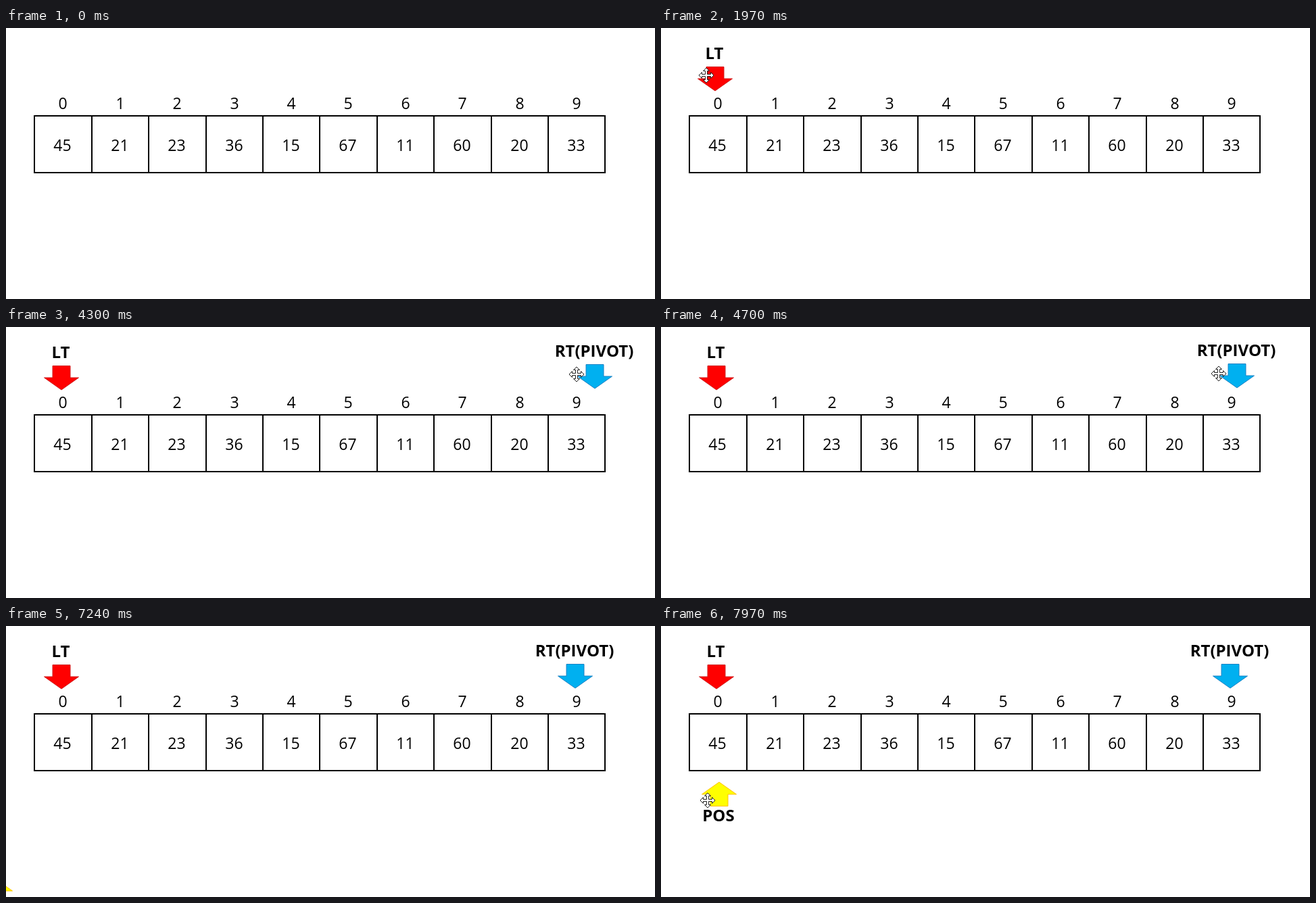
An HTML page that plays this animation: 960 px wide and 401 px high, repeating every 8000 ms.

```html
<!DOCTYPE html>
<html lang="en">
<head>
<meta charset="utf-8">
<title>Array pointers</title>
<style>
  html, body { margin: 0; width: 100%; height: 100%; overflow: hidden; background: #fff; }
  svg { display: block; }
  text { font: 23px "Open Sans", "Noto Sans", sans-serif; text-anchor: middle; }
  .label { font-size: 24px; font-weight: 700; }
  .grid { fill: none; stroke: #000; stroke-width: 2; }
  .frame { fill: none; stroke: #0078d4; stroke-dasharray: 4 3; }
  .handle { fill: #fff; stroke: #666; }
  .cursor { fill: #fff; stroke: #222; }
</style>
</head>
<body>
<svg id="stage" width="960" height="401" viewBox="0 0 960 401"></svg>
<script>
const LOOP = 8000;
const CELL = 84.4;
const stage = document.getElementById("stage");

function add(parent, tag, attrs, text) {
  const node = document.createElementNS("http://www.w3.org/2000/svg", tag);
  for (const name in attrs) node.setAttribute(name, attrs[name]);
  if (text !== undefined) node.textContent = text;
  return parent.appendChild(node);
}

// Array cells
add(stage, "rect", { class: "grid", x: 42, y: 130, width: 844, height: 84 });
[45, 21, 23, 36, 15, 67, 11, 60, 20, 33].forEach((value, i) => {
  const left = Math.round(42.4 + i * CELL);
  if (i) add(stage, "path", { class: "grid", d: `M${left} 130V214` });
  add(stage, "text", { x: left + 42, y: 120 }, i);
  add(stage, "text", { x: left + 41.5, y: 182 }, value);
});

// Each move eases from an offset to the start of the next move, or to rest.
// bow bends its path sideways; exit is where the mouse goes after release.
const pointers = [
  { label: "LT", x: 82, y: 93, dir: 1, baseline: 46, fill: "#f00", stroke: "#d01818",
    grab: [69, 70], release: 2140, exit: [899, 60], gone: 2370, deselect: 2900,
    box: { x: 37.5, y: 17.5, width: 79, height: 89 },
    moves: [
      { start: 500, end: 1100, from: [-95, -1], power: 3.3, bow: [0, -7] },
      { start: 1240, end: 1270, from: [-3, -1] },
      { start: 1970, end: 2000, from: [-2, 0] }
    ] },
  { label: "RT(PIVOT)", x: 842, y: 92, dir: 1, baseline: 45, fill: "#00b0f0", stroke: "#1c82c4",
    grab: [815, 71], release: 5570, exit: [251, 333], gone: 5740, deselect: 6300,
    box: { x: 772.5, y: 10.5, width: 141, height: 93 },
    moves: [
      { start: 4140, end: 4400, from: [145, 10], power: 2.6, bow: [0, 1] },
      { start: 4540, end: 4870, from: [19, -3] }
    ] },
  { label: "POS", x: 86, y: 231, dir: -1, baseline: 289, fill: "#ff0", stroke: "#ffc000",
    grab: [69, 258], release: LOOP,
    moves: [{ start: 7240, end: 7970, from: [-102, 143], power: 2, bow: [20, 0] }] }
];

for (const p of pointers) {
  p.node = add(stage, "g");
  add(p.node, "path", { fill: p.fill, stroke: p.stroke,
    d: `M${p.x} ${p.y}l-25.5 ${-18 * p.dir}h12.5v${-17.5 * p.dir}h26v${17.5 * p.dir}h12.5z` });
  add(p.node, "text", { class: "label", x: p.x - 1, y: p.baseline }, p.label);
  if (p.box) p.selection = addSelection(p.box);
}

function addSelection(box) {
  const group = add(stage, "g");
  add(group, "rect", { class: "frame", ...box });
  for (const u of [0, 0.5, 1])
    for (const v of [0, 0.5, 1])
      if (u !== 0.5 || v !== 0.5)
        add(group, "rect", { class: "handle", width: 4, height: 4,
          x: Math.floor(box.x + u * box.width) - 1.5, y: Math.floor(box.y + v * box.height) - 1.5 });
  return group;
}

// Four-way move cursor: one arm, turned four times
const outline = [];
let arm = [[-1.5, -1.5], [-1.5, -6.5], [-4.5, -6.5], [0, -11], [4.5, -6.5], [1.5, -6.5]];
for (let i = 0; i < 4; i++) {
  outline.push(...arm);
  arm = arm.map(([x, y]) => [-y, x]);
}
const cursor = add(stage, "polygon", { class: "cursor", points: outline.join(" ") });

function show(node, visible) {
  node.style.display = visible ? "" : "none";
}

function place(node, [x, y]) {
  node.setAttribute("transform", `translate(${Math.round(x)} ${Math.round(y)})`);
}

function progress(t, start, end) {
  return Math.min(1, Math.max(0, (t - start) / (end - start)));
}

function offsetAt(moves, t) {
  const i = Math.max(0, moves.filter(m => m.start <= t).length - 1);
  const { start, end, from, power = 1, bow = [0, 0] } = moves[i];
  const to = moves[i + 1] ? moves[i + 1].from : [0, 0];
  const k = progress(t, start, end);
  return from.map((a, n) =>
    to[n] + (a - to[n]) * (1 - k) ** power + bow[n] * Math.sin(Math.PI * k));
}

function draw(now) {
  const t = now % LOOP;
  let hand = null;
  for (const p of pointers) {
    const visible = t >= p.moves[0].start, offset = offsetAt(p.moves, t);
    show(p.node, visible);
    place(p.node, offset);
    if (p.selection) show(p.selection, t >= p.release && t < p.deselect);
    if (visible && t < p.release) {
      hand = p.grab.map((c, n) => c + offset[n]);
    } else if (t >= p.release && t < p.gone) {
      const k = progress(t, p.release, p.gone);
      hand = p.grab.map((c, n) => c + (p.exit[n] - c) * k);
    }
  }
  show(cursor, hand);
  if (hand) place(cursor, hand);
  requestAnimationFrame(draw);
}
draw(0);
</script>
</body>
</html>
```
